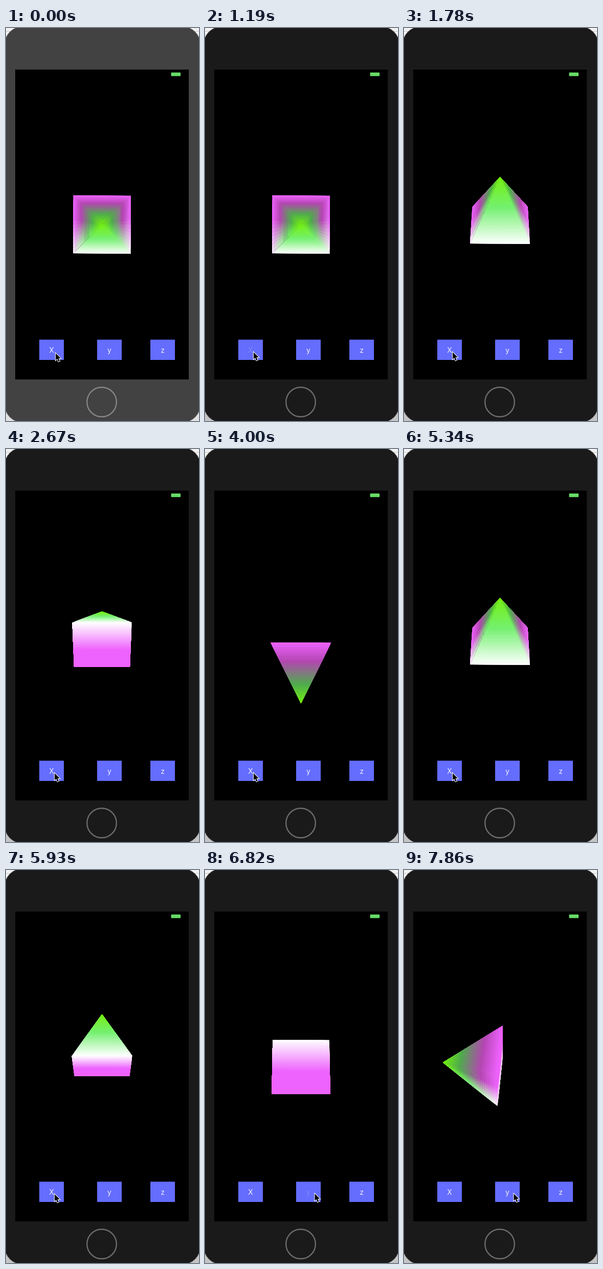
An HTML page with a canvas for the animation above (8 s loop, 377x766 px).

```html
<!DOCTYPE html>
<html lang="en">
<head>
<meta charset="utf-8">
<title>Rotating pyramid</title>
<style>
html, body { margin: 0; width: 100%; height: 100%; overflow: hidden; background: #f0f0f0; }
canvas { display: block; }
</style>
</head>
<body>
<canvas id="stage" width="377" height="766"></canvas>
<script>
const ctx = document.getElementById('stage').getContext('2d');
const LOOP = 8000, STEP = 148.1, LAST = 53;
const TURN = 15 * Math.PI / 180;           // rotation per step
const X_START = 8.63, Y_START = 46.67;     // steps at which each axis starts turning
const CENTER = [187.5, 383], UNIT = 56.2, CAMERA = 20;
const ROWS = 28, COLS = 14;

const clamp = v => Math.min(1, Math.max(0, v));
const lerp = (a, b, k) => a + (b - a) * k;
const mix = (a, b, k) => a.map((v, i) => lerp(v, b[i], k));

function ramp(stops, t) {
  let i = 1;
  while (i < stops.length - 1 && t > stops[i][0]) i++;
  const [t0, c0] = stops[i - 1], [t1, c1] = stops[i];
  return mix(c0, c1, clamp((t - t0) / (t1 - t0)));
}

const LIME = [116, 240, 16];
const UPPER = [[0, [238, 98, 253]], [.3, [180, 70, 178]], [.68, [78, 172, 76]], [1, LIME]];
const LOWER = [[0, [255, 255, 255]], [.55, [116, 240, 112]], [1, LIME]];

// Colour depends on the height above the base and the position between its edges.
function colorAt([, y, z]) {
  const t = z / 2, v = y / (1 - t);
  const c = mix(ramp(UPPER, t), ramp(LOWER, t), clamp((.2 - v) / 1.2));
  return `rgb(${c.map(Math.round)})`;
}

const CORNERS = [[-1, -1, 0], [1, -1, 0], [1, 1, 0], [-1, 1, 0]];
const APEX = [0, 0, 2];
const faces = CORNERS.map((a, i) => (t, v) => mix(mix(a, CORNERS[(i + 1) % 4], v), APEX, t));
faces.push((t, v) => [1 - 2 * v, 2 * t - 1, 0]);

function projector(ax, ay) {
  const cx = Math.cos(ax), sx = Math.sin(ax), cy = Math.cos(ay), sy = Math.sin(ay);
  return ([x, y, z]) => {
    const x1 = x * cy - z * sy, z1 = x * sy + z * cy;
    const y2 = y * cx + z1 * sx, z2 = z1 * cx - y * sx;
    const k = UNIT * CAMERA / (CAMERA - z2);
    return [CENTER[0] + x1 * k, CENTER[1] - y2 * k];
  };
}

function polygon(points) {
  ctx.beginPath();
  points.forEach(p => ctx.lineTo(...p));
  ctx.closePath();
}

function drawPyramid(n) {
  const project = projector(TURN * Math.max(0, n - X_START), TURN * Math.max(0, n - Y_START));
  for (const face of faces) {
    const [a, b, c] = [face(0, 0), face(0, 1), face(1, .5)].map(project);
    if ((b[0] - a[0]) * (c[1] - a[1]) - (b[1] - a[1]) * (c[0] - a[0]) >= 0) continue;
    // Each patch reaches to the far end; later ones cover it, so no seams show.
    for (let i = 0; i < ROWS; i++) {
      for (let j = 0; j < COLS; j++) {
        const t = i / ROWS, v = j / COLS;
        ctx.fillStyle = colorAt(face(t + .5 / ROWS, v + .5 / COLS));
        polygon([face(t, v), face(t, 1), face(1, 1), face(1, v)].map(project));
        ctx.fill();
      }
    }
  }
}

function rect(x, y, w, h, color, r = 0) {
  ctx.fillStyle = color;
  ctx.beginPath();
  ctx.roundRect(x, y, w, h, r);
  ctx.fill();
}

function drawPhone(active) {
  rect(0, 0, 377, 766, '#f2f2f2');
  rect(0, 6, 377, 1, '#c9c9c9');
  rect(0, 700, 377, 66, active ? '#c4c4c4' : '#e2e2e2');
  rect(-3, -3, 383, 772, active ? '#1a1a1a' : '#424242', 36);
  ctx.strokeStyle = '#777';
  ctx.lineWidth = 1;
  ctx.stroke();
  rect(18, 81, 339, 604, '#000');
  rect(322.5, 86.8, 18.5, 7, '#67dd67', 1);
  ctx.strokeStyle = active ? '#6c6c6c' : '#868686';
  ctx.lineWidth = 2.4;
  ctx.beginPath();
  ctx.arc(187, 729, 28.8, 0, 2 * Math.PI);
  ctx.stroke();
}

function drawButton(label, x, n, pressed) {
  rect(x, 607.5, 48, 39.5, '#646dfd');
  ctx.globalAlpha = n === pressed ? .2 : n === pressed + 1 ? .6 : 1;
  ctx.fillStyle = '#f0f0ff';
  ctx.font = '14px Inter, Roboto, sans-serif';
  ctx.textAlign = 'center';
  ctx.fillText(label, x + 24, 633);
  ctx.globalAlpha = 1;
}

function cursorAt(n) {
  if (n < 1) return [97, 634];
  if (n < 42) return [95, 632];
  return [[93, 634], [125, 637], [185, 638]][n - 42] || [214.5, 631];
}

function drawCursor(n) {
  ctx.save();
  ctx.translate(...cursorAt(n));
  polygon([[0, 0], [0, 13.6], [3.1, 10.8], [5.4, 16.2], [7.8, 15.2], [5.5, 10], [9.8, 9.8]]);
  ctx.lineWidth = 2;
  ctx.strokeStyle = '#fff';
  ctx.stroke();
  ctx.fillStyle = '#000';
  ctx.fill();
  ctx.restore();
}

let shown = -1;
function frame(now) {
  const n = Math.min(LAST, Math.floor((now % LOOP) / STEP));
  if (n !== shown) {
    shown = n;
    drawPhone(n >= 8);
    drawPyramid(n);
    drawButton('X', 65, n, 8);
    drawButton('y', 178, n, 46);
    drawButton('z', 282, n, -9);
    drawCursor(n);
  }
  requestAnimationFrame(frame);
}
frame(0);
</script>
</body>
</html>
```
